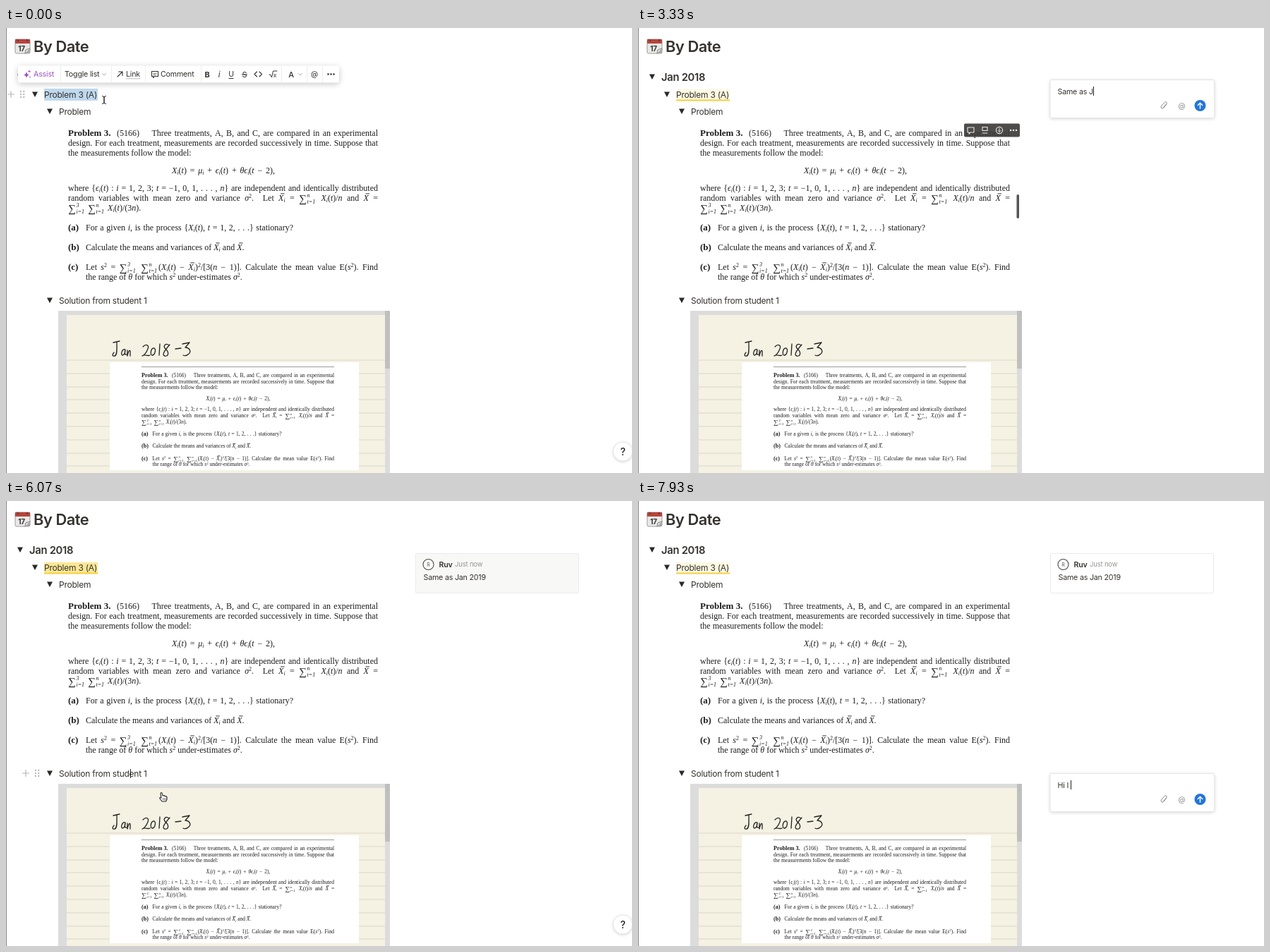
Write an HTML page with a canvas that moves like this. It is 887 px wide and 631 px high and loops after 8000 ms.

```html
<!DOCTYPE html>
<html lang="en">
<head>
<meta charset="utf-8">
<title>By Date</title>
<style>
html, body { margin: 0; width: 100%; height: 100%; overflow: hidden; background: #fff; }
canvas { display: block; width: 887px; height: 631px; }
</style>
</head>
<body>
<canvas id="stage" width="887" height="631"></canvas>
<script>
const ctx = document.getElementById('stage').getContext('2d');
const LOOP = 8000;
const INK = '#34322e';
const SANS = 'Inter, "Liberation Sans", sans-serif';
const SERIF = '"Liberation Serif", "DejaVu Sans", serif';

const ramp = (t, from, to) => Math.max(0, Math.min(1, (t - from) / (to - from)));
const window_ = (t, inA, inB, outA, outB) => ramp(t, inA, inB) * (1 - ramp(t, outA, outB));

function withAlpha(alpha, draw) {
  if (alpha <= 0) return;
  ctx.save();
  ctx.globalAlpha *= alpha;
  draw();
  ctx.restore();
}

function shifted(x, y, draw) {
  ctx.save();
  ctx.translate(x, y);
  draw();
  ctx.restore();
}

function rect(x, y, w, h, color) {
  ctx.fillStyle = color;
  ctx.fillRect(x, y, w, h);
}

function box(x, y, w, h, r, fill, stroke) {
  ctx.beginPath();
  ctx.roundRect(x, y, w, h, r);
  if (fill) { ctx.fillStyle = fill; ctx.fill(); }
  if (stroke) { ctx.strokeStyle = stroke; ctx.lineWidth = 1; ctx.stroke(); }
}

function disc(x, y, r, fill, stroke, width = 1) {
  ctx.beginPath();
  ctx.arc(x, y, r, 0, Math.PI * 2);
  if (fill) { ctx.fillStyle = fill; ctx.fill(); }
  if (stroke) { ctx.strokeStyle = stroke; ctx.lineWidth = width; ctx.stroke(); }
}

function stroke(path, color, width = 1) {
  ctx.strokeStyle = color;
  ctx.lineWidth = width;
  ctx.lineCap = ctx.lineJoin = 'round';
  ctx.stroke(new Path2D(path));
}

function fill(path, color) {
  ctx.fillStyle = color;
  ctx.fill(new Path2D(path));
}

// Text placed by the vertical middle of its capitals.
function text(str, x, y, size, color = INK, style = '400', align = 'left') {
  ctx.font = `${style} ${size}px ${SANS}`;
  ctx.letterSpacing = `${-0.02 * size}px`;
  ctx.textAlign = align;
  ctx.fillStyle = color;
  ctx.fillText(str, x, y + size * 0.364);
  const width = ctx.measureText(str).width;
  ctx.letterSpacing = '0px';
  return width;
}

// ---- Serif document --------------------------------------------------
// *bold* _italic_ ^superscript^ ~subscript~ |barred| @lower,upper@ (sum)
const MARKUP = /([*_^~|@])(.*?)\1|([^*_^~|@ ]+)|( )/g;
const serif = {
  '*': ['bold 13px', 0], '_': ['italic 12px', 0], '|': ['italic 12px', 0],
  '^': ['8px', -4], '~': ['italic 8px', 2], '': ['12px', 0]
};

function piece(kind, str, x, y, draw) {
  ctx.textAlign = 'left';
  ctx.fillStyle = '#1d1d1d';
  if (kind === '@') {
    const [low, high] = str.split(',');
    if (draw) {
      ctx.font = `15px ${SERIF}`;
      ctx.fillText('∑', x, y + 1.5);
      ctx.font = `italic 8px ${SERIF}`;
      ctx.fillText(high, x + 11.5, y - 5);
      ctx.fillText(low, x + 11.5, y + 4);
    }
    return 25;
  }
  const [font, rise] = serif[kind];
  ctx.font = `${font} ${SERIF}`;
  const width = ctx.measureText(str).width;
  if (draw) {
    ctx.fillText(str, x, y + rise);
    if (kind === '|') rect(x + 3, y - 10.5, 5.5, 0.9, '#1d1d1d');
  }
  return width;
}

function line(markup, x, middle, measure) {
  const y = middle + 4;
  const parts = [...markup.matchAll(MARKUP)].map(m => ({
    gap: !!m[4], kind: m[1] || '', str: m[2] || m[3] || ''
  }));
  let gap = 3;
  if (measure) {
    const used = parts.reduce((sum, p) => sum + (p.gap ? 0 : piece(p.kind, p.str, 0, 0, false)), 0);
    gap = (measure - used) / parts.filter(p => p.gap).length;
  }
  for (const p of parts) x += p.gap ? gap : piece(p.kind, p.str, x, y, true);
}

function problemSheet() {
  const X = '_X_~i~(_t_)';
  line('*Problem 3.*  (5166)    Three treatments, A, B, and C, are compared in an experimental', 88, 149, 439);
  line('design. For each treatment, measurements are recorded successively in time. Suppose that', 88, 163, 439);
  line('the measurements follow the model:', 88, 177);
  line(`${X} = _μ_~i~ + _ϵ_~i~(_t_) + _θϵ_~i~(_t_ − 2),`, 235, 202, 146);
  line('where {_ϵ_~i~(_t_) : _i_ = 1, 2, 3; _t_ = −1, 0, 1, . . . , _n_} are independent and identically distributed', 88, 227, 439);
  line(`random variables with mean zero and variance _σ_^2^.  Let |X|~i~ = @t=1,n@ ${X}/_n_ and |X| =`, 88, 241, 439);
  line(`@i=1,3@ @t=1,n@ ${X}/(3_n_).`, 88, 255);
  line('*(a)*', 88, 283);
  line(`For a given _i_, is the process {${X}, _t_ = 1, 2, . . .} stationary?`, 113, 283, 294);
  line('*(b)*', 88, 311);
  line('Calculate the means and variances of |X|~i~ and |X|.', 113, 311);
  line('*(c)*', 88, 339);
  line(`Let _s_^2^ = @i=1,3@ @t=1,n@(${X} − |X|~i~)^2^/[3(_n_ − 1)]. Calculate the mean value E(_s_^2^). Find`, 113, 339, 414);
  line('the range of _θ_ for which _s_^2^ under-estimates _σ_^2^.', 113, 353);
}

function notebook() {
  rect(74, 401, 470, 230, '#dcdcdc');
  rect(86, 407, 451, 224, '#f5f2e3');
  for (let y = 471; y < 631; y += 18.8) rect(86, Math.round(y) - 0.5, 451, 1, '#d9d7cc');
  rect(537, 401, 7, 82, '#bfbfbf');
  rect(147, 474, 353, 153, '#fff');
  rect(192, 480, 273, 1, '#999');
  shifted(137.3, 400.1, () => { ctx.scale(0.622, 0.62); problemSheet(); });

  const pen = [
    'M152 446L161 444M157 445C157 454 158 464 154 465C151 466 150 463 153 460',
    'M169 456C165 454 162 462 165 464C168 464 169 459 169 456C168 460 168 464 171 463',
    'M172 457L172 465C173 459 175 456 176 458L176 465',
    'M194 452C199 447 203 450 201 455C199 460 196 464 193 465C197 462 200 466 204 464',
    'M210 454C205 453 204 463 207 464C211 464 213 456 210 454',
    'M218 448L217 464',
    'M231 450C226 446 222 451 226 455C231 459 231 466 225 465C220 464 225 457 232 449',
    'M240 455L248 454',
    'M250 448L260 446L254 453C260 453 263 459 259 462C256 465 253 465 251 464'
  ];
  pen.forEach(p => stroke(p, '#222', 1.3));
}

// ---- Interface -------------------------------------------------------
function triangle(x, y) {
  fill(`M${x - 4} ${y - 3.5}h8l-4 7.5z`, '#2b2a27');
}

function calendarIcon() {
  box(13, 16, 21, 20, 2, '#e9e9e7', '#9b9b9b');
  rect(13, 16, 21, 6, '#b8443c');
  for (const x of [17, 30]) disc(x, 17.5, 1.2, '#5b3a38');
  text('17', 22, 29.5, 10, '#333', '700', 'center');
  fill('M27 36l7 -7v7z', '#a8a8a8');
  stroke('M27 36l1 -5l6 -2', '#666', 0.8);
}

function handles(x, y, alpha) {
  withAlpha(alpha, () => {
    stroke(`M${x - 4.5} ${y}h9M${x} ${y - 4.5}v9`, '#b5b4b1', 1.2);
    for (const dx of [14, 18.3])
      for (const dy of [-4, 0, 4]) disc(x + dx, y + dy, 1.15, '#b5b4b1');
  });
}

const chevron = (x, y, color) => stroke(`M${x - 2.5} ${y - 1}l2.5 2.5l2.5 -2.5`, color);
const bubble = (x, y, color) =>
  stroke(`M${x - 4.5} ${y - 4}h9v7h-5l-2 2v-2h-2z`, color, 1.1);

function dots(x, y, color) {
  for (const dx of [-4, 0, 4]) disc(x + dx, y, 1.25, color);
}

function formatBar() {
  ctx.save();
  ctx.shadowColor = 'rgba(0,0,0,.22)';
  ctx.shadowBlur = 8;
  ctx.shadowOffsetY = 2;
  box(17, 53.5, 455, 24, 3, '#fff');
  ctx.restore();
  for (const x of [77, 149, 197, 276, 390, 426, 448]) rect(x, 54, 1, 23, '#ededec');
  const y = 65.5, purple = '#a04fc4', size = 10.7;
  fill('M29 62q.8 4 4 4.5q-3.200 .5 -4 4.500q-.8 -4 -4 -4.500q3.200 -.5 4 -4.500z', purple);
  stroke('M33 60v3M31.500 61.500h3M34 68.500v2', purple, 0.9);
  text('Assist', 39, y, size, purple);
  text('Toggle list', 83, y, size);
  chevron(139, y, '#aaa');
  stroke('M158 69l6.500 -6.500M159.500 62h5.500v5.500', INK, 1.1);
  text('Link', 170, y, size);
  rect(170, 71.5, 20, 0.8, '#aaa');
  bubble(211, y, INK);
  stroke('M209 64.500h4M209 66.500h3', INK, 0.7);
  text('Comment', 219, y, size);
  text('B', 285, y, 11, INK, '700', 'center');
  text('i', 302, y, 11.5, INK, 'italic 400', 'center');
  text('U', 319, y, 10.5, INK, '400', 'center');
  rect(315.5, 71, 7, 1, INK);
  text('S', 338, y, 11, INK, '400', 'center');
  rect(334, y, 8, 1, INK);
  stroke('M355.500 62l-3.500 3.500l3.500 3.500M359 62l3.500 3.500l-3.500 3.500', INK, 1.1);
  stroke('M373 66l1.500 0l2 4l2 -9h5.500', INK);
  text('x', 381, 66.5, 8.5, INK, '400', 'center');
  text('A', 404, y, 11, INK, '500', 'center');
  chevron(417, y, '#aaa');
  text('@', 437, y, 10.5, INK, '400', 'center');
  dots(460.5, y, INK);
}

function imageBar(left, y, alpha, wide) {
  withAlpha(alpha, () => {
    box(left, y - 9.5, 541 - left, 19, 2, 'rgba(58,57,55,.9)');
    const c = '#e8e8e8';
    bubble(left + (wide ? 11 : 9.5), y, c);
    if (wide) {
      stroke(`M458 ${y - 4.5}h9M458 ${y + 4.5}h9M458 ${y - 2}h5v4h-5z`, c);
      chevron(474, y, c);
    }
    stroke(`M488 ${y - 4.500}h7v5h-7zM488 ${y + 4}h7`, c, 1.1);
    disc(512, y, 4.6, null, c, 1.1);
    stroke(`M512 ${y - 2.5}v4.500M510 ${y + 0.5}l2 2l2 -2`, c);
    dots(532, y, '#fff');
  });
}

function scrollGrip(y, h, alpha) {
  withAlpha(alpha, () => box(536.5, y, 3.5, h, 1.7, '#555'));
}

function commentBox(top, content, caret, alpha) {
  withAlpha(alpha, () => shifted(0, top, () => {
    ctx.save();
    ctx.shadowColor = 'rgba(0,0,0,.2)';
    ctx.shadowBlur = 5;
    ctx.shadowOffsetY = 1;
    box(584, 0.5, 232.5, 54, 2, '#fff');
    ctx.restore();
    box(584, 0.5, 232.5, 54, 2, null, '#e6e6e5');
    const width = content ? text(content, 594.5, 17, 10.7) : 0;
    if (!content) text('Add a comment…', 594.5, 17, 10.7, '#8d8c89');
    if (caret) rect(Math.round(594.5 + width), 10, 1, 13, '#222');
    stroke('M749 35l-4 5q-2 2 -3.500 .5q-1.200 -1.500 .5 -3.500l4 -4.500q1.500 -1.500 2.700 -.4q1.200 1.200 0 2.600l-4 4.500', '#8b8a87');
    text('@', 770.5, 37, 10.5, '#8b8a87', '400', 'center');
    disc(796.5, 37, 8, content ? '#2376d9' : '#cfcecc');
    stroke('M796.500 41v-7.500M793.300 36.500l3.200 -3.200l3.200 3.200', '#fff', 1.4);
  }));
}

function commentCard(active) {
  shifted(active ? -4 : 0, 0, () => {
    box(584.5, 74.5, 231, 56, 1, active ? '#f8f8f7' : '#fff', '#eaeae9');
    disc(602.5, 90, 7.5, '#fff', '#4a4947', 1.1);
    text('R', 602.5, 90, 7, '#555', '400', 'center');
    text('Ruv', 617.5, 90, 10.7, INK, '600');
    text('Just now', 640, 90, 9.5, '#979693');
    text('Same as Jan 2019', 595.5, 108.5, 10.7);
  });
}

function helpButton(alpha) {
  withAlpha(alpha, () => {
    ctx.save();
    ctx.shadowColor = 'rgba(0,0,0,.2)';
    ctx.shadowBlur = 4;
    ctx.shadowOffsetY = 1;
    disc(874, 600.5, 13.5, '#fff');
    ctx.restore();
    disc(874, 600.5, 13.5, null, '#e9e9e8');
    text('?', 874, 600.5, 14, '#222', '500', 'center');
  });
}

// ---- Timeline --------------------------------------------------------
// Each burst: start, interval, keys; '<' deletes one character.
const firstKeys = [[1130, 77, 'Same as '], [3330, 1, 'J'], [3530, 90, 'an 2018'], [4330, 1, '<'], [4400, 1, '9']];
const secondKeys = [[7530, 70, 'Hi'], [7730, 1, ' '], [7870, 60, 'I ']];
const caretFlips = [1930, 2130, 2400, 2670, 2930, 3130, 4670, 4930, 5200];

function typed(bursts, t) {
  let out = '';
  for (const [start, step, keys] of bursts)
    [...keys].forEach((key, i) => {
      if (t >= start + i * step) out = key === '<' ? out.slice(0, -1) : out + key;
    });
  return out;
}

const journeys = [
  [[0, 139, 102], [70, 139, 102], [340, 240, 67], [470, 242, 67], [800, 341, 146], [1070, 341, 146]],
  [[5530, 341, 170], [5870, 190, 388], [6070, 223, 420], [6530, 442, 414], [6740, 446, 414], [7200, 560, 430], [7270, 560, 430]]
];

function pointer(t) {
  const path = journeys.find(p => t >= p[0][0] && t < p[p.length - 1][0]);
  if (!path) return;
  const i = path.findIndex(k => k[0] > t);
  const [a, b] = [path[i - 1], path[i]];
  const u = ramp(t, a[0], b[0]), e = u * u * (3 - 2 * u);
  shifted(a[1] + (b[1] - a[1]) * e, a[2] + (b[2] - a[2]) * e, () => {
    if (t < 200 || (t > 5800 && t < 5930)) {
      stroke('M-2.500 -5.500q2.500 0 2.500 2v7q0 2 -2.500 2M2.500 -5.500q-2.500 0 -2.500 2v7q0 2 2.500 2', '#222');
      return;
    }
    const hand = 'M-4 -5C-4 -7 -2 -7 -1.700 -5L-1 -2L1 -2.500L2 -1.500L3.600 -1.500L5 0L5 3L3.600 6L-2 6L-5 2C-6 .5 -4 0 -3 1Z';
    fill(hand, '#fff');
    stroke(hand, '#222', 1.1);
    stroke('M-.5 1.500v2.500M1.300 1.500v2.500M3 1.500v2.500', '#444', 0.7);
  });
}

function scene(t) {
  rect(0, 0, 887, 631, '#fff');
  rect(0, 0, 1, 631, '#858585');
  calendarIcon();
  text('By Date', 39, 26.5, 21.8, INK, '600');
  triangle(20, 69);
  text('Jan 2018', 33, 69.5, 14.8, INK, '600');

  const commenting = t >= 400;
  const focused = t >= 5200 && t < 6400;
  if (!commenting) rect(54, 86, 76, 17, '#bfd9ee');
  else {
    rect(54, 87, 76, 15, focused ? '#fbe795' : '#fdf8e1');
    rect(54, 101.5, 76, 2, '#f7d03c');
  }
  triangle(41, 94);
  text('Problem 3 (A)', 54, 94.5, 12);
  triangle(62, 118);
  text('Problem', 75, 118.5, 12);
  problemSheet();
  triangle(62, 386);
  text('Solution from student 1', 75, 386.5, 12);
  if (t >= 5930 && t < 6400) rect(176, 380, 1, 13, '#222');
  notebook();

  handles(7, 94, 1 - ramp(t, 560, 840));
  handles(28, 118, 0.5 * window_(t, 600, 680, 720, 870));
  handles(49, 144, window_(t, 700, 770, 1000, 1070));
  handles(28, 386, window_(t, 5800, 5870, 6270, 6330));
  handles(49, 412, window_(t, 6330, 6400, 7070, 7200));

  const firstHover = window_(t, 700, 930, 5530, 5730);
  imageBar(462, 145, firstHover, false);
  scrollGrip(236, 34, firstHover);
  imageBar(432.5, 413.5, window_(t, 6330, 6470, 7000, 7200), true);
  const secondHover = window_(t, 6200, 6400, 7200, 7400);
  scrollGrip(503, 35, secondHover);
  scrollGrip(625, 10, secondHover);

  if (!commenting) formatBar();
  else if (t < 5330) {
    const caret = caretFlips.filter(f => t >= f).length % 2 === 0;
    commentBox(73, typed(firstKeys, t), caret, ramp(t, 400, 530));
  } else commentCard(t < 6400);
  commentBox(386, typed(secondKeys, t), true, ramp(t, 6800, 6930));

  helpButton(1 - window_(t, 1000, 1130, 5530, 5660) - ramp(t, 7460, 7600));
  pointer(t);
}

const start = performance.now();
function frame() {
  scene((performance.now() - start) % LOOP);
  requestAnimationFrame(frame);
}
frame();
</script>
</body>
</html>
```
